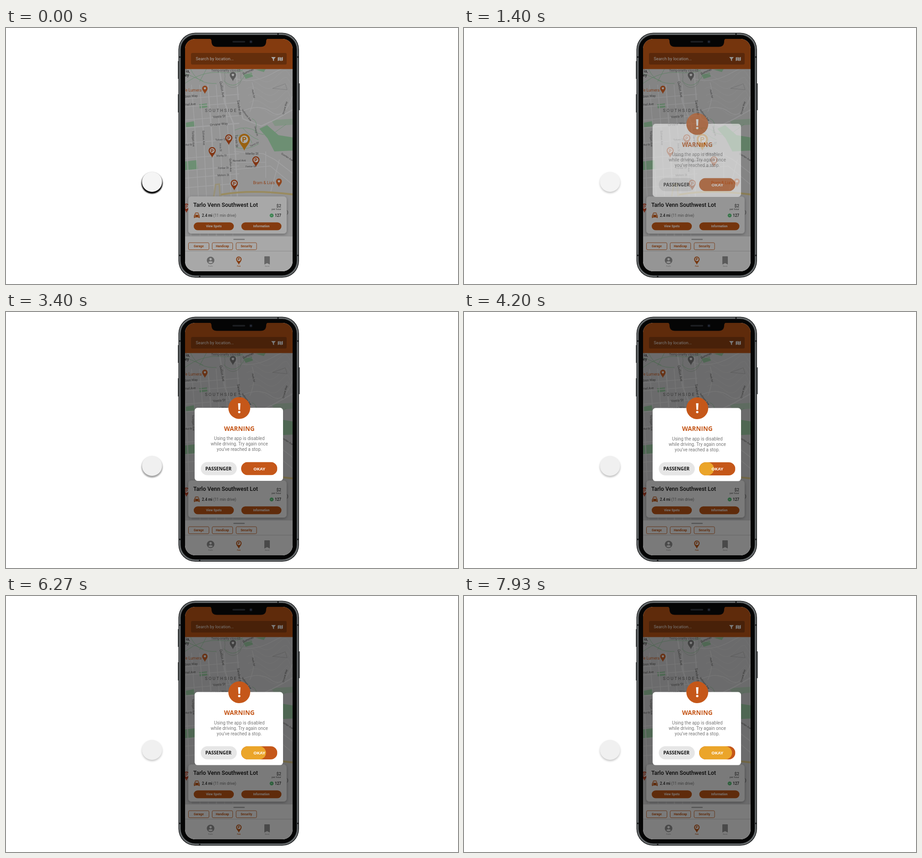
An HTML page for the animation above (8 s loop, 992 px wide and 564 px high).

```html
<!DOCTYPE html>
<html lang="en">
<head>
<meta charset="utf-8">
<title>Parking app warning</title>
<style>
  html, body { margin: 0; width: 100%; height: 100%; overflow: hidden; background: #fff; }
  svg { display: block; width: 992px; height: 564px; font-family: Roboto, sans-serif; }
  .bold { font-family: "Open Sans", sans-serif; font-weight: 700; }
  .mid { text-anchor: middle; }
  .end { text-anchor: end; }
</style>
</head>
<body>
<svg viewBox="0 0 992 564">
  <defs>
    <clipPath id="screenClip"><rect x="393" y="24" width="236" height="512" rx="22"/></clipPath>
    <clipPath id="mapClip"><rect x="393" y="90" width="236" height="369"/></clipPath>
    <clipPath id="okayClip"><rect x="516" y="330.5" width="79.5" height="29" rx="14.5"/></clipPath>
    <filter id="soft" x="-50%" y="-50%" width="200%" height="200%"><feGaussianBlur stdDeviation="2"/></filter>
    <filter id="tight" x="-20%" y="-20%" width="140%" height="140%"><feGaussianBlur stdDeviation=".8"/></filter>
    <filter id="cardShade" x="-10%" y="-10%" width="120%" height="130%">
      <feDropShadow dx="0" dy="2" stdDeviation="3" flood-opacity=".3"/>
    </filter>
    <g id="drop"><path d="M0 12C-2 6-8 2-8-4A8 8 0 0 1 8-4C8 2 2 6 0 12Z"/></g>
    <g id="parkPin">
      <use href="#drop" fill="currentColor"/>
      <circle cy="-4" r="5.4" fill="#fff"/>
      <text class="mid" y="-.4" font-size="10" font-weight="900" fill="currentColor">P</text>
    </g>
  </defs>

  <!-- tap indicator -->
  <circle cx="320.5" cy="341.5" r="22" fill="#000" opacity=".24" filter="url(#soft)"/>
  <circle id="press" cx="320.5" cy="341.8" r="23.2" fill="#000" filter="url(#tight)"/>
  <circle id="tap" cx="320.5" cy="339" r="22"/>

  <!-- phone body -->
  <path d="M378 73v39M378 146v40M643.8 122v59" stroke="#3a3d3f" stroke-width="1.6"/>
  <rect x="378.500" y="10.500" width="264.500" height="539.500" rx="37" fill="#1b1d1e"/>
  <rect x="381.500" y="13.500" width="258.500" height="533.500" rx="34" fill="none" stroke="#6b6f71" stroke-width="3"/>
  <path d="M379 64h4M639 64h4M379 501h4M639 501h4M425 546v4M597 11v4" stroke="#1b1d1e" stroke-width="3"/>
  <rect x="384" y="16" width="253.500" height="528.500" rx="31.500" fill="#050505"/>

  <g clip-path="url(#screenClip)">
    <rect x="393" y="24" width="236" height="512" fill="#fff"/>
    <g id="map" clip-path="url(#mapClip)"></g>

    <!-- search header -->
    <rect x="393" y="24" width="236" height="66.500" fill="#c85a17"/>
    <rect x="406" y="55" width="210" height="25.500" rx="3" fill="#000" opacity=".24"/>
    <text x="416.500" y="71.200" font-size="9.300" fill="#fff">Search by location...</text>
    <path d="M582 64h10l-3.800 4.600v4.400l-2.400-1.600v-2.800Z" fill="#fff"/>
    <path d="M596.500 65l3-1v7.500l-3 1.200ZM600.500 64l3 1v7.800l-3-1.200ZM604.500 65l3-1.200v7.700l-3 1.300Z" fill="#fff"/>

    <!-- parking lot card -->
    <rect x="400" y="371" width="216" height="82" rx="7" fill="#fff" filter="url(#cardShade)"/>
    <text x="411" y="394.300" font-size="12.400" font-weight="500" fill="#111">Tarlo Venn Southwest Lot</text>
    <text x="604" y="394.500" class="end" font-size="9.300" fill="#222">$2</text>
    <text x="604" y="401.300" class="end" font-size="5.700" fill="#555">per hour</text>
    <path d="M413.500 412l1.600-4.500q.4-.8 1.200-.8h5q.8 0 1.200.8l1.600 4.500.9 1.200v5.300h-2v-1.300h-8.500v1.300h-2v-5.300ZM415 411.500h7.800l-1.100-3.300h-5.600Z" fill="#c85a17" fill-rule="evenodd"/>
    <circle cx="415" cy="414.300" r="1" fill="#fff"/><circle cx="422.800" cy="414.300" r="1" fill="#fff"/>
    <text x="430" y="416" font-size="8.200" font-weight="500" fill="#222">2.4 mi <tspan font-weight="400" fill="#777">(11 min drive)</tspan></text>
    <circle cx="583" cy="413" r="4.300" fill="#5cc97c"/>
    <path d="M581 413h3.500" stroke="#fff" stroke-width=".8"/>
    <text x="604" y="416" class="end" font-size="8.200" font-weight="500" fill="#222">127</text>
    <g fill="#c85a17"><rect x="412" y="428.300" width="88" height="17.200" rx="8.600"/><rect x="516.500" y="428.300" width="88" height="17.200" rx="8.600"/></g>
    <g class="mid" font-size="6.800" font-weight="700" fill="#fff">
      <text x="456" y="439.400">View Spots</text><text x="560.500" y="439.400">Information</text>
    </g>

    <!-- filters and navigation -->
    <rect x="393" y="458.500" width="236" height="78" fill="#fff"/>
    <path d="M393 458.500H629M393 491.500H629" stroke="#d6d6d6"/>
    <rect x="499" y="464.500" width="25" height="2.600" rx="1.300" fill="#b2b2b2"/>
    <g fill="none" stroke="#c85a17" stroke-width=".9">
      <rect x="400.500" y="473" width="45" height="15.500" rx="2.500"/>
      <rect x="452.500" y="473" width="45" height="15.500" rx="2.500"/>
      <rect x="505" y="473" width="45" height="15.500" rx="2.500"/>
    </g>
    <g class="mid" font-size="6.800" font-weight="700" fill="#c85a17">
      <text x="423" y="483.200">Garage</text><text x="475" y="483.200">Handicap</text><text x="527.500" y="483.200">Security</text>
    </g>
    <circle cx="449" cy="512" r="8.300" fill="#9a9a9a"/>
    <circle cx="449" cy="509.300" r="2.600" fill="#fff"/>
    <path d="M443.800 516q5.200-4.500 10.400 0q-5.200 4.500-10.400 0Z" fill="#fff"/>
    <use href="#parkPin" transform="translate(511 512.500) scale(.75)" color="#c85a17"/>
    <path d="M567 504q0-1 1-1h10q1 0 1 1v17l-6-3-6 3Z" fill="#9a9a9a"/>
    <g class="mid" font-size="3.600" fill="#9a9a9a">
      <text x="449" y="526">Profile</text><text x="511" y="526" fill="#c85a17" font-weight="700">Park</text><text x="573" y="526">Saved</text>
    </g>
    <rect id="dim" x="393" y="24" width="236" height="512"/>
  </g>

  <!-- notch -->
  <path d="M446 23q5 1 5 6q0 12.500 12 12.500h96q12 0 12-12.500q0-5 5-6Z" fill="#050505"/>
  <rect x="497" y="28.500" width="28" height="3.600" rx="1.800" fill="#1d1f22"/>
  <circle cx="537.500" cy="30.300" r="3.500" fill="#14171d"/><circle cx="537.500" cy="30.300" r="1.500" fill="#30364a"/>

  <g id="modal">
    <rect x="414" y="211" width="194" height="161" rx="6.500" fill="#fff"/>
    <circle cx="512" cy="211.500" r="24" fill="#c55719"/>
    <text x="512" y="222.500" class="bold mid" font-size="31" fill="#fff">!</text>
    <text x="512" y="261.700" class="bold mid" font-size="13.500" fill="#c55719">WARNING</text>
    <g class="mid" font-size="10" fill="#777">
      <text x="512" y="282.300">Using the app is disabled</text>
      <text x="512" y="294.300">while driving. Try again once</text>
      <text x="512" y="306.300">you’ve reached a stop.</text>
    </g>
    <rect x="427.500" y="330.500" width="79" height="29" rx="14.500" fill="#e6e6e6"/>
    <g clip-path="url(#okayClip)">
      <rect x="516" y="330.500" width="79.500" height="29" fill="#c55719"/>
      <rect id="progress" x="516" y="330.500" height="29" rx="14.500" fill="#eba52a"/>
    </g>
    <text x="466.300" y="348.700" class="bold mid" font-size="10.100" fill="#111">PASSENGER</text>
    <text x="556" y="348.700" class="bold mid" font-size="9.600" fill="#fff">OKAY</text>
  </g>
</svg>
<script>
const $ = id => document.getElementById(id);
const LOOP = 8000;

const stroke = (d, color, width) =>
  `<path d="${d}" fill="none" stroke="${color}" stroke-width="${width}"/>`;
const fill = (d, color) => `<path d="${d}" fill="${color}"/>`;
const label = (text, x, y, size, turn = 0, color = '#5d5d5d', extra = '') =>
  `<text class="mid" transform="translate(${x} ${y}) rotate(${turn})" dy=".35em" font-size="${size}" fill="${color}" ${extra}>${text}</text>`;
const pin = (x, y, scale, color) =>
  `<use href="#parkPin" transform="translate(${x} ${y}) scale(${scale})" color="${color}"/>`;
const placePin = (x, y, scale, color) =>
  `<g transform="translate(${x} ${y}) scale(${scale})"><use href="#drop" fill="${color}"/><path d="M-3-7h6v4q-3 4-6 0Z" fill="#fff"/></g>`;

function drawMap() {
  const green = '#a5d9ae', road = '#f4f4f5', orange = '#d9682c';
  let out = '<rect x="393" y="90" width="236" height="369" fill="#e1e1e2"/>';

  // Parks
  out += fill('M556 222L573 214 598 236 629 241V270L589 272 574 243Z', green);
  out += fill('M582 203L629 200V213L590 216Z', '#c6e0ca');
  out += fill('M393 209l21-4 2 13-23 3ZM393 294l26-3 2 20-28 4ZM424 168l17-2 1 9-17 2Z', green);
  out += fill('M521 102l18-4 3 9-16 5ZM548 92l22-2-4 7Z', green);

  // Hill contours
  for (let i = 0; i < 6; i++) {
    const y = 104 + i * 15;
    out += stroke(`M${522 + i * 3} ${y}C${545 + i * 5} ${y - 18} ${560 + i * 4} ${y + 34} ${590 + i * 3} ${y + 6}S612 ${y - 10} 632 ${y + 12}`, '#ebebeb', 1);
  }
  out += stroke('M585 133l28-10 4 13Z', '#aaa', .6);

  // Street grid
  for (const x of [396, 416, 434, 452, 470, 488])
    out += stroke(`M${x - 9} 125L${x} 240 ${x + 10} 460`, road, x === 452 ? 2.8 : 1.6);
  for (const y of [156, 174, 203, 220, 254, 287, 314, 331, 352])
    out += stroke(`M393 ${y}L512 ${y - 10}`, road, y === 220 ? 2.6 : 1.6);
  out += stroke('M468 90L480 165 499 210 504 285 508 372', road, 2.8);
  out += stroke('M505 92L510 160 520 200 560 216 590 202 629 180', road, 2.4);
  out += stroke('M500 272L565 277 590 290 629 320M498 296H570M500 312L580 304 629 345M570 272V330M600 290L580 365', road, 1.6);
  out += stroke('M515 185Q555 165 582 185T629 150M500 110Q540 125 585 100T629 94M540 120Q550 150 535 185', road, 1.4);

  // Footpaths
  out += stroke('M393 122Q430 95 470 98T520 92M405 90Q420 125 462 122M440 90L425 118M393 100l40 17M478 116q20 20 38 0t-10-26', green, 1);
  out += stroke('M502 225q25-12 50 4M505 263q24 8 50-8M504 238q28-8 36 16M520 221q18 20 34 25M540 200q15 5 6 30l20 5M590 230l25-18', green, 1);
  out += stroke('M481 107a18 18 0 1 1 34 0a18 18 0 1 1-34 0', '#bbc9be', 1);

  // Main road
  out += stroke('M456 372L460 345 468 344 470 372', '#e6dcb8', 3.5);
  out += stroke('M472 367Q540 355 632 367', '#e8d391', 4);

  // Large labels
  out += label('SOUTHSIDE', 472.5, 182, 9, 0, '#666', 'letter-spacing="2.6"');
  out += label('Temporarily closed', 482, 93, 7.5, 0, '#777');
  out += label('ia,', 399, 95, 9, 0, '#444', 'font-weight="500"');
  out += label('ey', 397, 104, 9, 0, '#444', 'font-weight="500"');
  out += label('fe Lumera', 410, 137, 8.6, 0, orange);
  out += label("Bram &amp; Lia's", 566, 340.5, 8.8, 0, orange);
  out += placePin(436.5, 136, .75, orange) + placePin(599, 341, .8, orange);
  out += placePin(498, 107, .85, '#858585');

  // Street names: text, x, y, size, turn
  [
    ['dren Way', 406, 150, 7, -4], ['mel Ave', 404, 168, 7, -4],
    ['Vesta St', 468, 195, 7.4, -5], ['Orvane Way', 467, 212, 7.4, -5],
    ['Marby St', 540, 276, 7.2, 0], ['Marby St', 473, 281, 5.7, -3],
    ['Tolven St', 471, 246, 5.7, -3], ['Norvel Ave', 512, 292, 6, -2],
    ['Fenlar St', 477, 308, 6, -3], ['Fenlar St', 537, 304.5, 5.7, 0],
    ['Melorn St', 477, 324, 6, -3], ['Quillon Ave', 474.5, 135, 7.2, 80],
    ['Sandrel St', 512, 175, 7.2, 82], ['Tarvin St', 506, 249, 7.2, 86],
    ['Quillon Ave', 493, 302, 6, 88], ['Solvane Ave', 434, 242, 6, 87],
    ['Torlegan Ave', 411, 244, 6, 87], ['Imra St', 471, 263, 5.7, 87],
    ['Velmora Ave', 528, 192, 5.7, 52], ['Pelth Rd', 543, 145, 5, 78],
    ['Orvane Way', 612, 176, 5.5, -75], ['Ombrel Pl', 549, 227, 5, 78],
    ['Summel', 531, 96, 7, -24], ['Tarvin Cir', 545, 256, 5, -25],
    ['Quorlen Ave', 617, 284, 5.5, 33], ['Bul St', 401, 257, 5.5, -3]
  ].forEach(args => out += label(...args));
  out += label(')', 618, 406, 9, 0, '#444');

  // Parking pins
  out += pin(396, 397, .85, '#c94b2c');
  for (const [x, y] of [[489, 246], [452.5, 274], [548.5, 294.5], [501, 346]])
    out += pin(x, y, .98, '#c4501d');
  out += pin(523, 251.5, 1.55, '#e8941c');
  $('map').innerHTML = out;
}

const clamp = v => Math.min(1, Math.max(0, v));
const mix = (a, b, k) => a + (b - a) * k;

// Linear interpolation through [time, value] keys.
function track(keys, t) {
  for (let i = 1; i < keys.length; i++) {
    const [t0, v0] = keys[i - 1], [t1, v1] = keys[i];
    if (t <= t1) return mix(v0, v1, clamp((t - t0) / (t1 - t0)));
  }
  return keys[keys.length - 1][1];
}

const pressKeys = [[0, 1], [600, .6], [1330, 0], [1730, 0], [1870, .9], [2600, .55], [3400, .22], [4330, 0]];
const tapKeys = [[0, 245], [1300, 243], [1730, 243], [1900, 233], [3400, 240]];

function draw(t) {
  const shown = clamp((t - 1180) / 400);
  const running = clamp((t - 3530) / 300);
  const grey = Math.round(track(tapKeys, t));

  $('press').setAttribute('opacity', track(pressKeys, t));
  $('tap').setAttribute('fill', `rgb(${grey},${grey},${grey})`);
  $('dim').setAttribute('opacity', mix(.34, .52, shown ** 1.5));
  $('modal').setAttribute('opacity', shown);
  $('modal').setAttribute('transform', `translate(0 ${running * .6})`);
  $('progress').setAttribute('opacity', running);
  $('progress').setAttribute('width', Math.max(0, 44 + (t - 5270) * .0106));
}

function tick() {
  draw(performance.now() % LOOP);
  requestAnimationFrame(tick);
}

drawMap();
tick();
</script>
</body>
</html>
```
